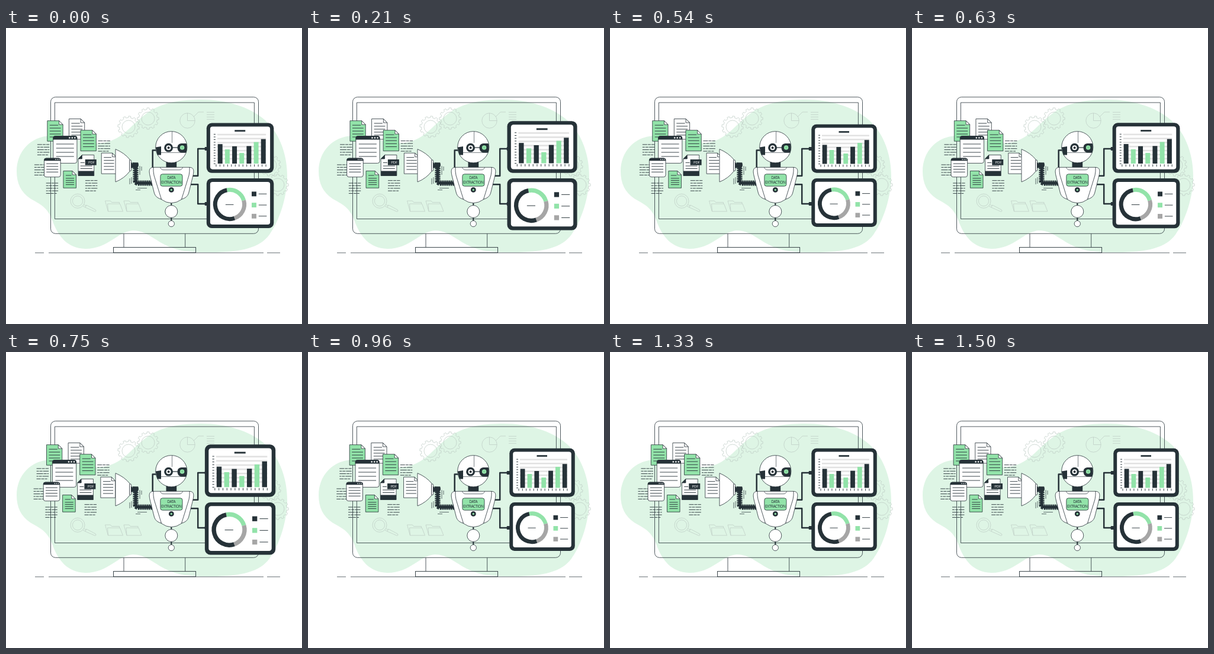
These frames come from a looping animation (500x500 px, 1.54 s). An HTML page:

```html
<!DOCTYPE html>
<html lang="en">
<head>
<meta charset="utf-8">
<title>Data extraction</title>
<style>
html, body { margin: 0; width: 100%; height: 100%; overflow: hidden; background: #fff; }
svg { display: block; width: 100vw; height: 100vh; }
text { font-family: "Open Sans", Roboto, sans-serif; font-stretch: 75%; text-anchor: middle; }
</style>
</head>
<body>
<svg id="stage" viewBox="0 0 500 500"></svg>
<script>
const INK = '#263238', GREEN = '#92e3a9', PALE = '#def5e5', GRAY = '#a6a6a6', FAINT = '#bccbc3';
const line = (w = 0.8, c = INK) => `stroke="${c}" stroke-width="${w}"`;
const path = (d, a = line(), fill = 'none') => `<path d="${d}" fill="${fill}" ${a}/>`;
const rect = (x, y, x2, y2, fill, r = 0, a = '') =>
  `<rect x="${x}" y="${y}" width="${x2 - x}" height="${y2 - y}" rx="${r}" fill="${fill}" ${a}/>`;
const circle = (x, y, r, fill, a = '') => `<circle cx="${x}" cy="${y}" r="${r}" fill="${fill}" ${a}/>`;
const range = (n, f) => Array.from({ length: n }, (_, i) => f(i)).join('');
const rows = (x, x2, y, step, n, w = 0.9) => path(range(n, i => `M${x} ${y + i * step}H${x2}`), line(w));

function backdrop() {
  return path('M18 242C18 210 40 183 76 182C108 181 130 197 163 194C200 189 212 160 245 139' +
    'C271 124 300 121 330 121C372 121 412 133 438 156C464 180 475 216 475 250' +
    'C475 286 462 325 445 349C429 371 398 379 345 379C305 380 280 375 256 359' +
    'C240 349 230 342 214 342C188 344 173 373 134 373C103 372 88 351 79 327' +
    'C71 302 56 297 41 288C25 277 18 262 18 242Z', '', PALE);
}

function gear(x, y, turn) {
  const teeth = 12, pts = [];
  for (let i = 0; i < teeth; i++) {
    for (const [off, r] of [[-0.25, 15.6], [-0.2, 18.2], [0.2, 18.2], [0.25, 15.6]]) {
      const a = (i + off + turn) / teeth * Math.PI * 2;
      pts.push((x + r * Math.cos(a)).toFixed(1) + ' ' + (y + r * Math.sin(a)).toFixed(1));
    }
  }
  return path('M' + pts.join('L') + 'Z', line(0.7, FAINT)) + circle(x, y, 11, 'none', line(0.7, FAINT));
}

function ornaments() {
  const a = line(0.7, FAINT);
  const folder = x => path(`M${x + 5} 309.8L${x} 292H${x + 9}L${x + 11} 294.5H${x + 24}V297` +
    `M${x + 5} 309.8L${x + 4} 297H${x + 25}L${x + 30} 309.8Z`, a);
  return gear(207, 167, 0.2) + gear(240, 153, 0) + gear(446, 232, 0.3) + gear(459, 265, 0) +
    circle(306.5, 156.5, 12.7, 'none', a) +
    path('M306.5 143.8V156.5H319.2M317 150L325 142H334M339 142.3H352M339 146.3H352M339 150.3H352M339 154.3H352', a) +
    circle(121, 292.3, 12, 'none', a) + circle(121, 292.3, 8.6, 'none', a) +
    path('M131.5 298.3L135.5 300.5M130 300.8L134 303M135.8 299L151 307Q153.5 309.5 150.5 310.3L133.8 303Z', a) +
    folder(167.5) + folder(199);
}

function monitor() {
  return rect(75.5, 116.7, 426.5, 347.3, 'none', 8, line()) +
    path('M82.4 126H419.4V322.5H82.4ZM199 347.3V370.5M302.7 347.3V370.5') +
    path('M49 379.8H64M72 379.8H435M441 379.8H463', line(0.7)) +
    rect(181.5, 370.6, 320.6, 379.5, 'none', 0, line(0.9));
}

function sheet(x, y, w, h, fill) {
  const f = 6.5, x2 = x + w;
  return path(`M${x} ${y}H${x2 - f}L${x2} ${y + f}V${y + h}H${x}Z`, line(), fill) +
    path(`M${x2 - f} ${y}V${y + f}H${x2}Z`, line(), '#fff') +
    path(`M${x + 4} ${y + 7.5}H${x2 - 8}`, line(0.9)) +
    rows(x + 4, x2 - 3.5, y + 12.4, (h - 14.5) / 4, 4);
}

function page(x, y, x2, y2, bar, dot) {
  return rect(x, y, x2, y2, '#fff', 3.5, line()) +
    path(`M${x} ${y + bar}V${y + 3}Q${x} ${y} ${x + 3} ${y}H${x2 - 3}Q${x2} ${y} ${x2} ${y + 3}V${y + bar}Z`, line(0.6), INK) +
    range(3, i => circle(x2 - dot * (1.2 + i * 1.5), y + bar / 2, dot * 0.42, '#fff'));
}

function snippet(x, y) {
  const cuts = [12, 8, 15, 7, 11];
  return path(cuts.map((c, i) => {
    const v = y + i * 4.35;
    return `M${x} ${v}H${x + c - 4}M${x + c - 3} ${v}H${x + c + 2}M${x + c + 3} ${v}H${x + (i == 4 ? 18 : 20.4)}`;
  }).join(''), line(0.9));
}

function documents() {
  return snippet(53.2, 196.9) + snippet(48.2, 231) + snippet(68, 262) + snippet(134.2, 257.7) + snippet(155.8, 190.7) +
    sheet(70.1, 156.7, 26.3, 34.5, GREEN) +
    sheet(106.7, 153.5, 26.3, 34.5, '#fff') +
    sheet(126.3, 172.7, 26.3, 35, GREEN) +
    page(80, 182.6, 120.2, 228.4, 5.6, 3) + rows(85, 115, 196, 7, 4) +
    path('M128.7 214.5H149V249.5H122.3V221Z', line(), '#fff') +
    path('M128.7 214.5V221H122.3Z', line(), INK) +
    rect(122.3, 241.5, 149, 249.8, INK) +
    rows(126, 133, 227.5, 5, 1) + rows(126, 146, 233, 4.5, 2) +
    rect(134, 222, 153, 231.7, INK) +
    '<text x="144.6" y="229.1" font-size="6" letter-spacing="-.2" fill="#fff">PDF</text>' +
    page(64.8, 220, 92.4, 251.7, 4, 2) + rows(68.5, 88.5, 229.2, 4.7, 4) +
    sheet(97.2, 241.5, 21.6, 28.7, GREEN) +
    sheet(161.5, 211.2, 24.8, 35, '#fff');
}

function funnel() {
  const hose = 'M211 232H215Q219 232 219 236V257Q219 262 224 262H248';
  return path('M185 204.7Q200 211 209 222V242Q200 254 185 260Z', line(), '#fff') +
    rect(208.7, 223, 211.7, 241.5, '#fff', 1.5, line()) +
    path(hose, line(5)) + path(hose, line(9.2) + ' stroke-dasharray="2.4 1.1"') +
    path('M214 227.5H223Q225 232 222 236H213Z', line(0.5), INK) +
    path('M209 254V264M212 252V263M226 233V248M229 234V241M222 270.5H238M219 273.5H227', line(0.7));
}

function robot() {
  const cable = line(2.5) + ' stroke-linejoin="round"';
  const arm = 'M249 235.3C241 235.5 241.5 242 243 249L250.5 279Q253 287 262.5 289.3L250 249Q248.5 242 249 235.3Z';
  const label = (y, s) => `<text x="279.3" y="${y}" font-size="6.5" letter-spacing="-.4" fill="${INK}">${s}</text>`;
  return path('M314 249.8H324.2V204H339M311 264.2H324.2V297H339', cable) +
    rect(335.7, 201, 342, 207, INK, 1) + rect(335.7, 294, 342, 300, INK, 1) +
    path('M247.7 237V206.5H254', cable) +
    rect(270.5, 225, 288.2, 236, INK) +
    circle(279.3, 201.2, 26.6, '#fff', line()) +
    path('M255 210.5H303.5M280.5 174.8V194', line(0.6)) +
    path('M274 202H294', line(1.2)) +
    path('M252.7 201.5L262 200V214.5H255.5Z', '', INK) +
    circle(274.6, 202.2, 7.4, INK) + circle(274.6, 202.2, 4, '#fff') + circle(274.6, 202.2, 2, INK) +
    path('M304.5 195H296Q289.5 196 289.5 202Q289.5 209 296 210.5H304.5Q306.8 202 304.5 195Z', '', INK) +
    circle(297.6, 202, 3.8, GREEN) + circle(297.6, 202, 1.4, '#7fcb95') +
    path('M279.3 295V300M279.3 319V327', line(2)) +
    path('M249 235.3H310L314 246L297 289.3Q279.5 302 262 289.3L246 246Z', line(), '#fff') +
    path(arm, line(), '#fff') +
    `<g transform="translate(559 0) scale(-1 1)">${path(arm, line(), '#fff')}</g>` +
    path('M260.5 235.3Q262 239.7 266 239.7H293Q297 239.7 298.5 235.3', line(0.7)) +
    rect(260.8, 246.8, 298, 267.2, GREEN, 3.5, line()) +
    label(255, 'DATA') + label(263, 'EXTRACTION') +
    circle(279.3, 273.4, 4.4, INK) + circle(279.3, 273.4, 1.6, GREEN) +
    circle(279.3, 310, 10.5, '#fff', line()) + circle(279.3, 330.6, 5.1, '#fff', line());
}

const frame = y => rect(340.3, y, 450.8, y + 81.9, INK, 8.5) + rect(346.2, y + 5.8, 444.8, y + 76, '#fff', 4);

function barPanel() {
  const tops = [197.4, 206, 201, 212, 200.6, 194, 189.2];
  return frame(162.8) + rect(386.5, 174.2, 404, 176.9, INK) +
    range(7, i => rect(358, 180.5 + i * 6.6, 438, 183 + i * 6.6, '#e2e2e2')) +
    tops.map((y, i) => rect(358.7 + i * 11.85, y, 366.5 + i * 11.85, 229.5, i % 2 ? GREEN : INK)).join('') +
    path(range(12, i => `M352 ${181.2 + i * 4.4}H355`) + range(14, i => `M${356 + i * 6.3} 230.8V234.5`), line(0.9));
}

function ringPanel() {
  const arc = (from, to, c) => {
    const at = d => {
      const a = d * Math.PI / 180;
      return `${378.4 + 24 * Math.cos(a)} ${296.8 + 24 * Math.sin(a)}`;
    };
    return path(`M${at(from)}A24 24 0 ${to - from > 180 ? 1 : 0} 1 ${at(to)}`, line(6.8, c));
  };
  return frame(254) + arc(-101, -16, GREEN) + arc(-16, 71, GRAY) + arc(71, 259, INK) +
    rows(371.5, 384.7, 297.2, 1, 1) +
    [INK, GREEN, GRAY].map((c, i) => rect(414.5, 275.8 + i * 18.25, 422.2, 283.5 + i * 18.25, c)).join('') +
    rows(426, 439.2, 279.6, 18.25, 3);
}

const stage = document.getElementById('stage');
stage.innerHTML = backdrop() + ornaments() + monitor() +
  `<g id="docs">${documents()}</g>` + funnel() + robot() +
  `<g id="bars">${barPanel()}</g><g id="ring">${ringPanel()}</g>`;
const [docs, bars, ring] = ['docs', 'bars', 'ring'].map(id => document.getElementById(id));

const LOOP = 1540, STEPS = 37;
const SHAKE = [0, -1, 2, -3, 2.9, -2.2, 2.2, -2.2, 2, -1, 0];
const BEAT = [0, 1, 0.5, 0, 0, 0.92, 0, 0, 0, 0, 0];

// Linear blend between keys set every tenth of the loop
function sample(keys, p) {
  const i = Math.floor(p * 10), f = p * 10 - i;
  return keys[i] + ((keys[i + 1] ?? keys[0]) - keys[i]) * f;
}

function draw(ms) {
  const step = Math.floor(((ms + 6) % LOOP) / LOOP * STEPS);
  const p = (step + 1) % STEPS / STEPS;
  const s = 1 + 0.1 * sample(BEAT, p);
  const grow = y => `translate(395.5 ${y}) scale(${s}) translate(-395.5 ${-y})`;
  docs.setAttribute('transform', `translate(${sample(SHAKE, p)} 0)`);
  bars.setAttribute('transform', grow(244.6));
  ring.setAttribute('transform', grow(254));
}

const start = performance.now();
function tick() {
  draw(performance.now() - start);
  requestAnimationFrame(tick);
}
draw(0);
requestAnimationFrame(tick);
</script>
</body>
</html>
```
